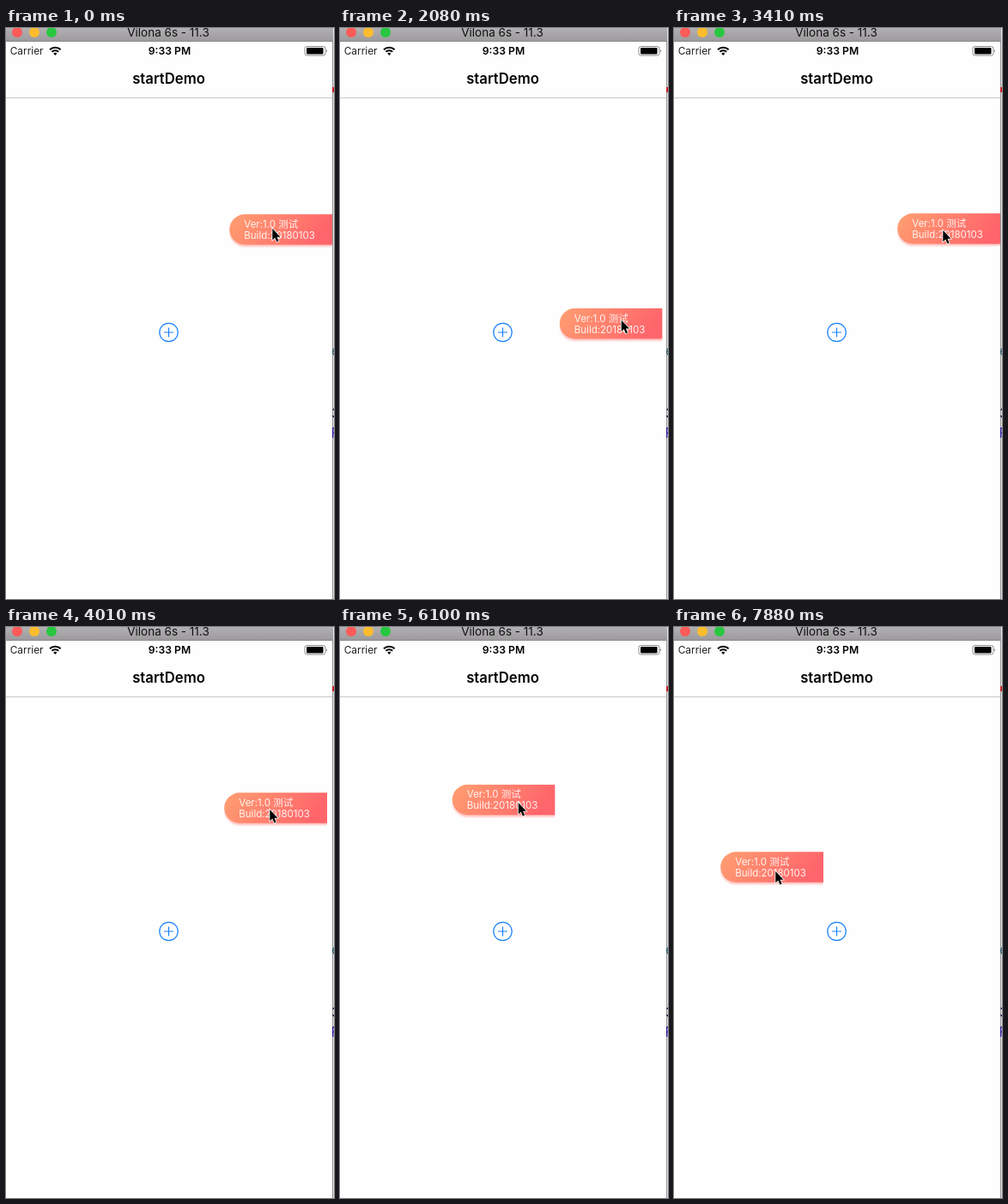
Recreate the animation shown at these times as an HTML page. Size 382 px wide and 666 px high, loop 8000 ms.

```html
<!DOCTYPE html>
<html lang="zh-CN">
<head>
<meta charset="utf-8">
<style>
html, body { margin: 0; width: 100%; height: 100%; overflow: hidden; background: #fff; }
svg { display: block; width: 382px; height: 666px; font-family: Inter, "Noto Sans CJK SC", "Noto Sans CJK", sans-serif; }
.mid { text-anchor: middle; }
.bold { font-weight: 600; }
</style>
</head>
<body>
<svg viewBox="0 0 382 666">
  <defs>
    <linearGradient id="bar" x2="0" y2="1">
      <stop stop-color="#b2b0b2"/><stop offset="1" stop-color="#9b999b"/>
    </linearGradient>
    <linearGradient id="warm" x2="1" y2=".2">
      <stop stop-color="#ff9f71"/><stop offset="1" stop-color="#ff656b"/>
    </linearGradient>
    <filter id="soft" x="-10%" y="-20%" width="120%" height="150%"><feGaussianBlur stdDeviation="1.3"/></filter>
    <clipPath id="screen"><path d="M0 16H380V666H0z"/></clipPath>
    <clipPath id="tagBox"><path d="M0 0H120V41H0z"/></clipPath>
    <path id="pill" d="M18 .3H120V35.700H18A17.700 17.700 0 0 1 18 .3z"/>
  </defs>

  <!-- window -->
  <path d="M380 0h2v666h-2z" fill="#e4e4e4"/>
  <path d="M0 0H380V666H0z" fill="#fefefe"/>
  <path d="M0 0H381V16H0z" fill="url(#bar)"/>
  <path d="M0 15.500H381" stroke="#8b898b"/>
  <path d="M380.500 16V666" stroke="#949494"/>
  <circle cx="13" cy="5" r="6" fill="#fc5b57"/>
  <circle cx="33" cy="5" r="6" fill="#fdbc2e"/>
  <circle cx="53" cy="5" r="6" fill="#27c840"/>
  <text class="mid" x="189" y="10" font-size="13.500" fill="#111">Vilona 6s - 11.3</text>

  <!-- letters of the desktop, cut by the stage edge -->
  <path d="M380 69h2v6h-2z" fill="#c8202a"/>
  <g font-size="16">
    <text x="379" y="382" fill="#2d5a68">e</text>
    <text x="379" y="455" fill="#1c1c48">3</text>
    <text x="378.500" y="478" fill="#2a1f9c">F</text>
  </g>

  <!-- status bar -->
  <text x="4.700" y="31" font-size="11.900" fill="#222">Carrier</text>
  <g fill="none" stroke="#000" stroke-width="2">
    <path d="M51 25.200a9 9 0 0 1 12.600 0M53.400 27.800a5.600 5.600 0 0 1 7.800 0"/>
  </g>
  <path d="M57.300 32l-2.100-2.300a3 3 0 0 1 4.200 0z"/>
  <text class="mid bold" x="190.500" y="31" font-size="12.200">9:33 PM</text>
  <rect x="348" y="21.500" width="24" height="10.500" rx="2.500" fill="none" stroke="#8a8a8a"/>
  <rect x="350" y="23" width="19.500" height="7.500" rx="1"/>
  <path d="M373 25v3.500q1.800-1.700 0-3.500z" fill="#555"/>

  <!-- navigation bar -->
  <text class="mid bold" x="189.500" y="65" font-size="16.700">startDemo</text>
  <path d="M0 81.500H380" stroke="#c8c8c8"/>

  <g fill="none" stroke="#1a82fb" stroke-width="1.200">
    <circle cx="189.500" cy="355" r="10.700"/>
    <path d="M184 355h11M189.500 349.500v11"/>
  </g>

  <g clip-path="url(#screen)">
    <g id="tag">
      <g clip-path="url(#tagBox)">
        <use href="#pill" y="2.300" fill="#ff6a62" opacity=".42" filter="url(#soft)"/>
        <use href="#pill" fill="url(#warm)"/>
      </g>
      <g fill="#fff" fill-opacity=".9" font-size="11.500">
        <text x="17.300" y="15.800">Ver:1.0 测试</text>
        <text x="17.300" y="28.800">Build:20180103</text>
      </g>
    </g>
  </g>

  <path id="cursor" d="M.3 1V14.300L3.300 11.500L5.400 16.500L7.600 15.600L5.500 10.700H9.500z"
        stroke="#fff" stroke-width="1.500" paint-order="stroke"/>
</svg>
<script>
const LOOP = 8000, TICK = 148.6, LAST = 53;
const RIGHT = 260, LEFT = 1; // docked positions of the tag

// Each stop: tick of arrival, tag position, pointer offset inside the tag
const stops = [
  { at: 0, pos: [RIGHT, 217], grip: [50, 16] },
  { at: 6, pos: [169, 283], grip: [51, 15] },
  { at: 15, wait: 2, pos: [RIGHT, 329], grip: [73, 13] },
  { at: 17, pos: [237, 361], grip: [73, 13] },
  { at: 19, pos: [265, 336], grip: [73, 13] },
  { at: 23, pos: [RIGHT, 216], grip: [53, 19] },
  { at: 27, pos: [254, 193], grip: [53, 19] },
  { at: 29, pos: [RIGHT, 193], grip: [53, 19] },
  { at: 37, wait: 1, pos: [RIGHT, 182], grip: [90, 19] },
  { at: 45, pos: [LEFT, 185], grip: [64, 22] },
  { at: 51, wait: 2, pos: [55, 264], grip: [64, 22] },
  { at: LAST, pos: [54, 262], grip: [64, 22] }
];
const tag = document.getElementById("tag");
const cursor = document.getElementById("cursor");

const ease = u => (1 - Math.cos(Math.PI * u)) / 2;
const mix = (a, b, u) => a.map((v, i) => v + (b[i] - v) * u);
const place = (el, [x, y]) => el.setAttribute("transform", `translate(${x} ${y})`);

function draw() {
  // the screen refreshes in ticks
  const tick = Math.min(LAST, Math.floor((performance.now() % LOOP + 20) / TICK));
  const i = Math.max(1, stops.findIndex(s => s.at >= tick));
  const a = stops[i - 1], b = stops[i];
  const start = a.at + (b.wait || 0);
  const u = ease(Math.max(0, (tick - start) / (b.at - start)));
  const pos = mix(a.pos, b.pos, u), grip = mix(a.grip, b.grip, u);
  place(tag, pos);
  place(cursor, [pos[0] + grip[0], pos[1] + grip[1]]);
  requestAnimationFrame(draw);
}
draw();
</script>
</body>
</html>
```
